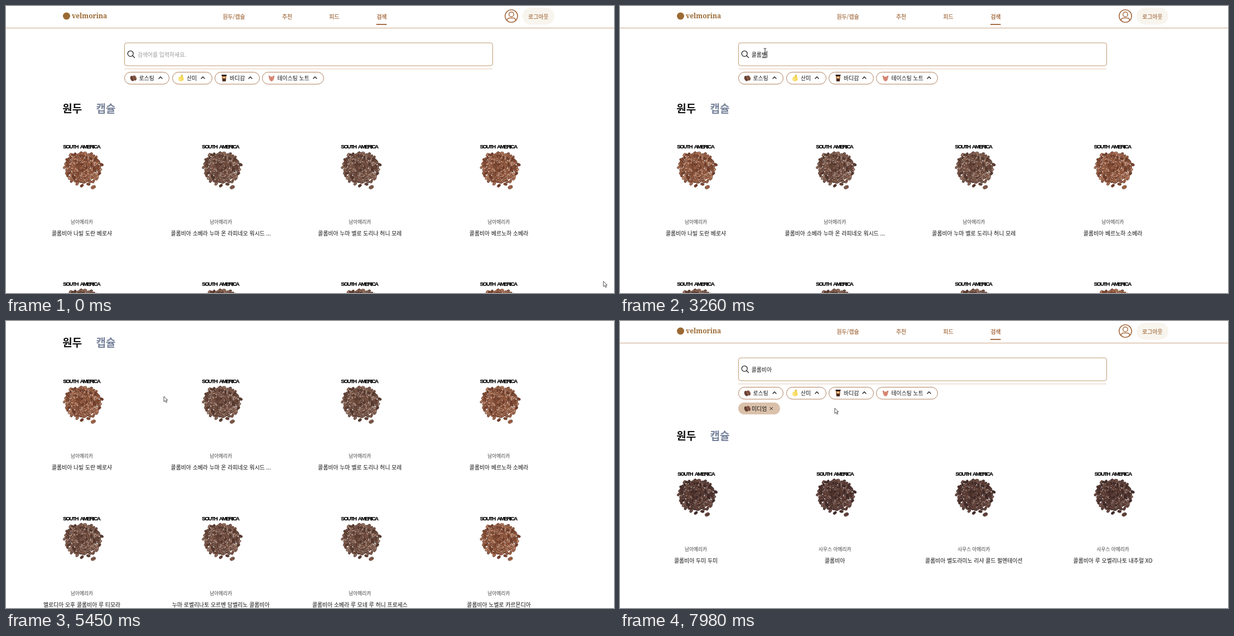
An HTML page that plays this animation: 1090 px wide and 514 px high, repeating every 8 s.

```html
<!DOCTYPE html>
<html lang="ko">
<head>
<meta charset="utf-8">
<title>원두 검색</title>
<style>
  html, body { margin: 0; width: 100%; height: 100%; overflow: hidden; background: #fff; }
  svg { display: block; width: 1090px; height: 514px; }
  text { font-family: "Noto Sans CJK KR", "Noto Sans CJK", "Noto Sans KR", sans-serif; white-space: pre; }
  .brand { font-family: "Noto Serif", serif; }
  .label { font: bold 9.8px "Liberation Sans", sans-serif; letter-spacing: -1.45px; word-spacing: 2.6px; stroke: #000; stroke-width: .25px; }
</style>
</head>
<body>
<svg id="stage" viewBox="0 0 1090 514"></svg>
<script>
const LOOP = 8000;
const BROWN = '#b28560', DARK = '#a86f45';

// Text is placed by the vertical middle of its glyphs.
const text = (x, y, s, { size = 9.9, fill = '#111', weight = 400, anchor = 'start', extra = '' } = {}) =>
  `<text x="${x}" y="${(y + size * .37).toFixed(2)}" font-size="${size}" fill="${fill}" font-weight="${weight}" text-anchor="${anchor}" ${extra}>${s}</text>`;
const line = (d, color, width = 1) =>
  `<path d="${d}" fill="none" stroke="${color}" stroke-width="${width}" stroke-linecap="round" stroke-linejoin="round"/>`;
const box = (x, y, w, h, r, fill, stroke = 'none') =>
  `<rect x="${x}" y="${y}" width="${w}" height="${h}" rx="${r}" fill="${fill}" stroke="${stroke}"/>`;

function randomFrom(seed) {
  return () => (seed = (seed * 16807) % 2147483647) / 2147483647;
}

// A heap of beans on a sunflower spiral: dense in the middle, thinning out towards the rim.
function beanPile(id, tones, crease, shine) {
  const rnd = randomFrom(4711);
  const count = 165;
  let out = '';
  for (let i = count; i > 0; i--) {
    const angle = i * 2.39996;
    const reach = Math.pow(i / count, .56) * (.95 + rnd() * .16);
    const x = Math.cos(angle) * reach * 32.5 + rnd() * 2 - 1;
    const y = Math.sin(angle) * reach * (Math.sin(angle) > 0 ? 31 : 26) + rnd() * 2 - 1;
    const tone = tones[Math.floor(rnd() * tones.length)];
    out += `<g transform="translate(${x.toFixed(1)} ${y.toFixed(1)}) rotate(${Math.floor(rnd() * 180)})">
      <ellipse rx="3.5" ry="2.3" fill="${tone}" stroke="${crease}" stroke-width=".45"/>
      <path d="M-2.500 .2Q0 -.9 2.500 .2" fill="none" stroke="${rnd() < .4 ? crease : shine}" stroke-width=".7"/></g>`;
  }
  out += `<g transform="translate(19 36) rotate(-25)"><ellipse rx="4.400" ry="3" fill="${tones[1]}" stroke="${crease}" stroke-width=".5"/>${line('M-3 .3Q0 -1 3 .3', crease, .8)}</g>`;
  return `<g id="${id}">${out}</g>`;
}

const cardX = col => 136 + col * 249.2;
const CARD_MIDDLE = 316.5;

function card(row, col, pile, title, region = '남아메리카', labelShift = 0) {
  const mid = { anchor: 'middle' };
  return `<g transform="translate(${cardX(col)} ${row * 245.7})"><g data-card="${row}${col}">
    <text class="label" x="${-.8 + labelShift}" y="255.2" text-anchor="middle">SOUTH AMERICA</text>
    <use href="#${pile}" x="1.5" y="288.5"/>
    ${text(0, 386.5, region, { ...mid, size: 8.7, fill: '#444' })}
    ${text(0, 407, title, mid)}</g></g>`;
}

const icons = {
  bean: `<g transform="rotate(-25)"><ellipse cx="-1.8" rx="3.4" ry="5" fill="#6d4638"/><ellipse cx="2.4" cy="1" rx="3.2" ry="4.8" fill="#8a5d4c"/>${line('M-2.4-4Q-.6 0-2.4 4M2-3Q4 1 2 5', '#4a2c22', .7)}</g>`,
  lemon: `<path d="M1-6Q4-4 4 0Q6 4 2 5Q-3 7-5 3Q-5-2-1-3Z" fill="#f7d95c"/><circle cx="-2" cy="2" r="2" fill="#fbe98d"/><path d="M-1-5L3-6 2-3Z" fill="#d8b33a"/>`,
  cup: `<path d="M-4-5H4L3 6H-3Z" fill="#4b2a1d"/><path d="M-4.5-6H4.5V-4H-4.5Z" fill="#2f1b14"/><path d="M-4-3H4L3.6 1H-3.6Z" fill="#c98a4c"/><circle cy="-1" r="1.5" fill="#f5dfc2"/>`,
  tongue: `<path d="M-5-4Q0-1 5-4Q5 5 0 6Q-5 5-5-4Z" fill="#d98b78"/><path d="M-5-5L-2-2H-5ZM5-5L2-2H5Z" fill="#b96a58"/>${line('M0-1V4', '#b96a58', .7)}`
};
const icon = (name, x, y) => `<g transform="translate(${x} ${y})">${icons[name]}</g>`;
const chevron = x => `M${x - 3} 130L${x} 126.8 ${x + 3} 130`;

const chip = ([x, w, name, iconX, label, labelX, arrowX]) =>
  box(x + .5, 118.5, w - 1, 21.5, 10.75, '#fff', '#b0815f') + icon(name, iconX, 129) +
  text(labelX, 129.3, label) + (name === 'bean' ? '' : line(chevron(arrowX), '#222', 1.3));

const nav = [['원두/캡슐', 408.5], ['추천', 504], ['피드', 588.5], ['검색', 673.5]];
const chips = [
  [212, 81, 'bean', 228, '로스팅', 238.5, 277],
  [298, 72, 'lemon', 314, '산미', 324, 353],
  [374, 81, 'cup', 391, '바디감', 401, 438],
  [459, 111, 'tongue', 476, '테이스팅 노트', 486.5, 554]
];
const before = [
  ['red', '콜롬비아 나빌 도란 베로샤'], ['dark', '콜롬비아 소베라 누마 온 라피네오 워시드 ...'],
  ['dark', '콜롬비아 누마 벨로 도리나 허니 모레'], ['red', '콜롬비아 베르노하 소베라'],
  ['dark', '멜로디아 오후 콜롬비아 루 티모라'], ['dark', '누마 로벨리나토 오르벤 담벨리노 콜롬비아'],
  ['dark', '콜롬비아 소베라 루 모네 루 허니 프로세스'], ['red', '콜롬비아 노벨로 카르몬디아']
];
const after = ['콜롬비아 두미 두미', '콜롬비아', '콜롬비아 벨도라미노 리샤 콜드 펄멘테이션', '콜롬비아 루 오벨리나토 내추럴 XO'];

const header = `
  <circle cx="108.5" cy="18" r="6.5" fill="#9b6a34"/>
  ${text(118, 17.5, 'velmorina', { size: 12, weight: 700, fill: '#9b6a34', extra: 'class="brand"' })}
  ${nav.map(([s, x], i) => text(x, 19, s, { anchor: 'middle', weight: 700, fill: i === 3 ? DARK : BROWN })).join('')}
  <path d="M664 32h18.500v2h-18.500z" fill="${DARK}"/>
  <circle cx="906" cy="18" r="11.2" fill="none" stroke="${DARK}" stroke-width="1.6"/>
  <circle cx="906" cy="15" r="4.3" fill="none" stroke="${DARK}" stroke-width="1.5"/>
  ${line('M898 26Q899 21.500 903 21.500H909Q913 21.500 914 26', DARK, 1.5)}
  ${box(926, 3, 57, 30.5, 15.2, '#f8f5ee')}
  ${text(954.5, 19, '로그아웃', { anchor: 'middle', weight: 700, fill: BROWN })}
  <path d="M0 39h1090v1H0z" fill="#cba689"/>`;

const search = `
  ${box(212.5, 66, 660, 41, 4, '#fff', '#c09b72')}
  <circle cx="223.200" cy="85.300" r="5" fill="none" stroke="#222" stroke-width="1.3"/>
  ${line('M227 89L230.500 92.500', '#222', 1.3)}
  ${text(235.7, 87, '', { extra: 'id="query"' })}
  <path id="caret" d="M0 80.500V92.500" stroke="#111"/>
  <path id="underline" d="M0 92.700h8.500" stroke="#111" stroke-width=".8"/>
  <path d="M212 112.300h660v1H212z" fill="#e3cbb9"/>`;

const results = `
  ${text(101.3, 183.5, '원두', { size: 19, weight: 600 })}
  ${text(161.5, 183.5, '캡슐', { size: 19, weight: 600, fill: '#78849c' })}
  <g id="before">${before.map(([pile, title], i) => card(i >> 2, i % 4, pile, title)).join('')}</g>
  <g id="after">${after.map((title, i) => card(0, i, 'deep', title, i ? '사우스 아메리카' : undefined, 1)).join('')}</g>`;

const menu = box(212.5, 146.5, 83, 141, 7, '#fff', '#d5d5d5') +
  ['라이트', '미디엄 라이트', '미디엄', '미디엄 다크', '다크'].map((s, i) => text(223, 164.3 + i * 26.1, s)).join('');

const tag = box(212, 146, 75, 21.3, 10.6, '#dac1aa') + icon('bean', 228, 156.7) +
  text(236, 157, '미디엄') + line('M269 154.500L273.500 159M273.500 154.500L269 159', '#222', 1);

const cursors = `
  <path id="arrow" d="M0 0V9.500L2.300 7.500 4 11 5.600 10.200 4 6.800H6.800Z" fill="#fff" stroke="#222" stroke-width=".8"/>
  <path id="hand" d="M-2 5V-5Q-1-7 .3-5V-1Q1.500-2 2.500-.7Q4-1.500 4.700-.2Q6-.5 6 1V3Q5.500 5 4.500 7H-1L-5 2Q-5 0-3.500 .800L-2 2Z" fill="#fff" stroke="#222" stroke-width=".8"/>
  <path id="beam" d="M-2.300-5.500H-.8L0-5 .8-5.500H2.300M0-5V5M-2.300 5.500H-.8L0 5 .8 5.500H2.300" fill="none" stroke="#222"/>`;

stage.innerHTML = `
  <defs>
    ${beanPile('red', ['#93583f', '#ad6f52', '#7a4431', '#b98065', '#8a5039'], '#56301f', '#d3aa95')}
    ${beanPile('dark', ['#785345', '#8d6555', '#5f4036', '#9a7767', '#6c493d'], '#40291f', '#bda294')}
    ${beanPile('deep', ['#5d3d35', '#6d4a40', '#493130', '#7a584e', '#52362f'], '#2f1e1c', '#957569')}
  </defs>
  <g id="page">${header}${search}${chips.map(chip).join('')}
    <path id="roastArrow" fill="none" stroke="#222" stroke-width="1.3" stroke-linecap="round" stroke-linejoin="round"/>
    <g id="tag">${tag}</g><g id="results">${results}</g><g id="menu">${menu}</g></g>
  <g id="pointer">${cursors}</g>`;

const $ = id => document.getElementById(id);
const show = (id, on) => $(id).setAttribute('visibility', on ? 'visible' : 'hidden');
const move = (id, x, y) => $(id).setAttribute('transform', `translate(${x} ${y})`);
const clamp = v => Math.max(0, Math.min(1, v));
const smooth = v => v * v * (3 - 2 * v);

// Eased values along [time, ...values] stops.
function along(stops, t) {
  let i = 0;
  while (i < stops.length - 2 && t > stops[i + 1][0]) i++;
  const [a, b] = [stops[i], stops[i + 1]];
  const k = smooth(clamp((t - a[0]) / (b[0] - a[0])));
  return a.slice(1).map((v, j) => v + (b[j + 1] - v) * k);
}

const pointerPath = [
  [60, 1071, 493], [200, 890, 300], [400, 890, 300], [840, 252, 89.5], [1260, 252, 89.5], [1330, 260, 81.5],
  [4190, 260, 81.5], [4600, 434, 293], [4990, 434, 293], [5450, 283, 135], [5900, 283, 135],
  [6060, 261, 130], [6290, 261, 130], [6580, 240, 217], [7380, 240, 217], [7700, 438, 170], [7960, 385, 156]
];
const scrollPath = [[4590, 0], [5130, 175], [5306, 175], [5850, 0]];
const typing = [
  [1990, 'ㅋ'], [2190, '코'], [2305, '콜'], [2420, '콜ㄹ'], [2535, '콜로'], [2650, '콜롬'],
  [2990, '콜롬ㅂ'], [3130, '콜롬비'], [3260, '콜롬빙'], [3400, '콜롬비아']
];
const hovers = [['03', 100, 480], ['01', 4450, 5120]];

function draw(t) {
  const scroll = along(scrollPath, t)[0];
  const [x, y] = along(pointerPath, t);
  const filtered = t >= 6720;
  const open = t >= 6120 && t < 7580;

  move('page', 0, -scroll);
  move('results', 0, filtered ? 22 : 0);
  show('before', !filtered);
  show('after', filtered);
  show('tag', filtered);
  show('menu', open);
  $('roastArrow').setAttribute('d', open ? 'M274 126.800L277 130 280 126.800' : chevron(277));

  const typed = typing.filter(([at]) => t >= at).pop()?.[1] ?? '';
  const query = $('query');
  query.textContent = typed || '검색어를 입력하세요.';
  query.setAttribute('fill', typed ? '#111' : '#999');
  move('caret', 236 + typed.length * 9.1, 0);
  show('caret', t >= 1800 && t < 6090);
  move('underline', 236 + (typed.length - 1) * 9.1, 0);
  show('underline', typed && t < 3660);

  let overCard = false;
  for (const [id, start, end] of hovers) {
    const k = smooth(clamp((t - start) / 100)) * (1 - smooth(clamp((t - end) / 100)));
    const scale = 1 + .1 * k;
    $('before').querySelector(`[data-card="${id}"]`)
      .setAttribute('transform', `translate(0 ${CARD_MIDDLE * (1 - scale)}) scale(${scale})`);
    overCard ||= t >= start && t < end;
  }

  const pageY = y + scroll;
  const overInput = x > 212 && x < 872 && pageY > 66 && pageY < 107;
  move('pointer', x, y);
  show('hand', overCard);
  show('beam', overInput && !overCard);
  show('arrow', !overCard && !overInput);
}

function tick() {
  draw(performance.now() % LOOP);
  requestAnimationFrame(tick);
}
tick();
</script>
</body>
</html>
```
